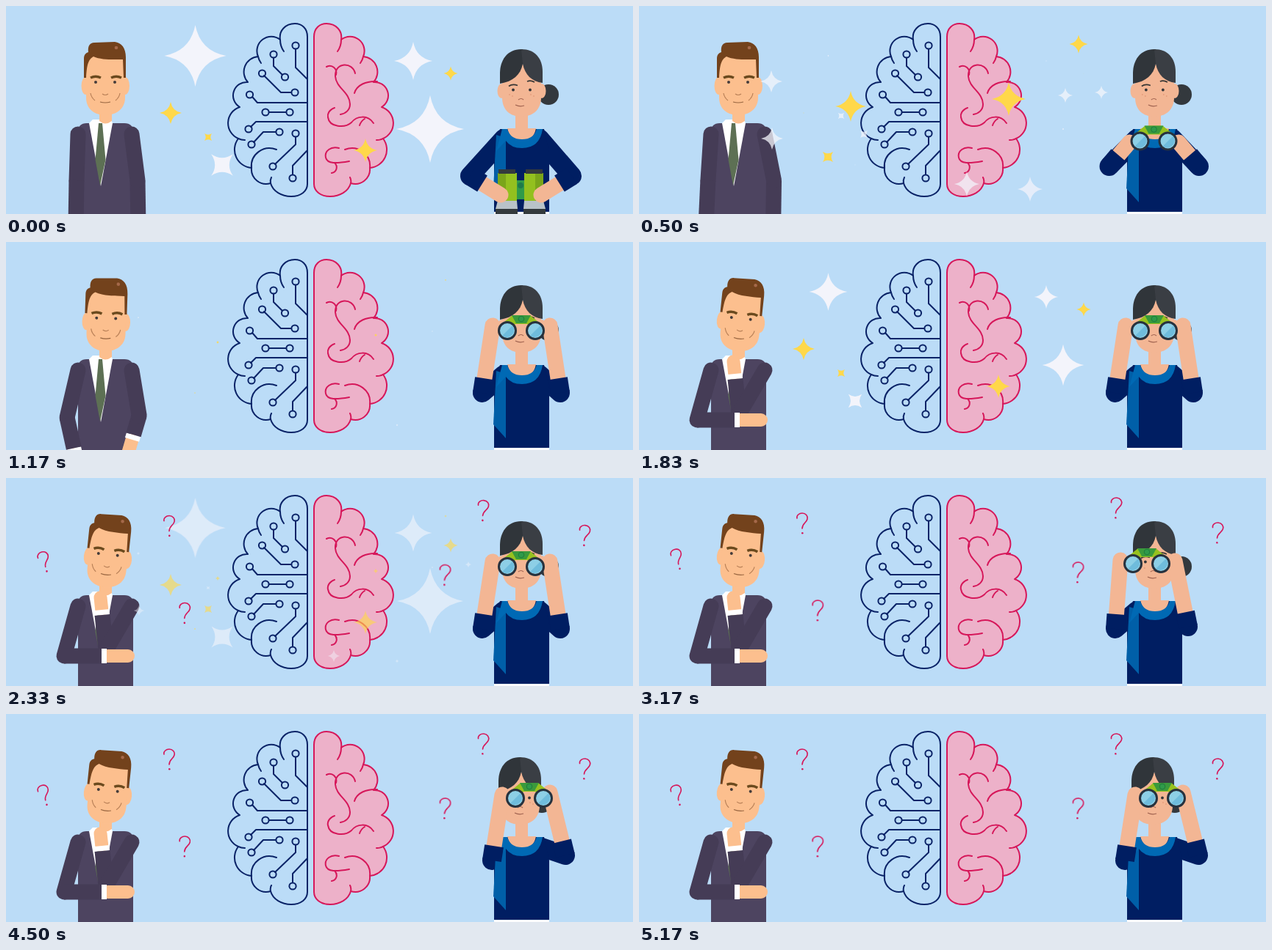
Animation of 853 by 284 pixels, one loop 5.25 s. Source, as an HTML page:

```html
<!DOCTYPE html>
<html lang="en">
<head>
<meta charset="utf-8">
<title>Thinking and looking</title>
<style>
  html, body { margin: 0; width: 100%; height: 100%; overflow: hidden; background: #bbdcf7; }
  svg { display: block; width: 100vw; height: 100vh; }
  .line { fill: none; stroke-width: 2; stroke-linecap: round; stroke-linejoin: round; }
  .navy { stroke: #0a2367; }
  .red { stroke: #d6175a; }
  .limb { fill: none; stroke-linecap: round; }
  .butt { stroke-linecap: butt; }
  .sleeve { stroke: #453c56; stroke-width: 21; }
  .cuff { stroke: #fff; stroke-width: 20; }
  .hand { stroke: #fcbf8e; stroke-width: 18; }
  .forearm { stroke: #f3b694; stroke-width: 21; }
  .top { stroke: #001e62; stroke-width: 26; }
</style>
</head>
<body>
<svg viewBox="0 0 853 284" preserveAspectRatio="none">
  <defs>
    <path id="half" d="M410 42C410 30 402 24 393 24C380 24 371 34 373 46A19.500 19.500 0 0 0 343 69A21 21 0 0 0 329 104A18.300 18.300 0 0 0 318 138A23 23 0 0 0 316 181A25 25 0 0 0 334 221A20 20 0 0 0 360 242C363 253 375 260 388 260C401 260 410 253 410 243Z"/>
    <path id="folds" d="M373 46Q373 55 378 62M343 69Q344 74 347 78M334 221C332 203 350 189 368 196M360 242Q359 238 361 234M316 181Q320 183 325 183"/>
    <path id="star" d="M0-1Q.16-.16 1 0Q.16.16 0 1Q-.16.16-1 0Q-.16-.16 0-1Z"/>
    <g id="ask">
      <path class="line red" style="stroke-width:1.6" d="M-7-7C-8-11-4-14 0-14C5-14 8-10 7-6C6-1 0 0 0 7"/>
      <circle cx=".3" cy="13.3" r="1.3" fill="#d6175a"/>
    </g>
  </defs>

  <rect width="853" height="284" fill="#bbdcf7"/>

  <g class="line navy">
    <use href="#half"/><use href="#folds"/>
    <path d="M394 59V84L410 100M364 71V82L376 94M351 95L374 118H388M335 124L342 132H410M358 145H381M333 165L340 158H410M337 186L350 172H367M394 179V189L366 216M390 230V218L410 197"/>
    <g id="nodes"></g>
  </g>
  <g class="line red">
    <g transform="matrix(-1 0 0 1 829 0)"><use href="#half" fill="#edb1c9"/><use href="#folds"/></g>
    <path d="M436 83C444 79 451 86 449 94M475 92C472 76 447 76 448 96C449 112 468 118 468 134C468 142 462 147 455 148M447 139C439 142 437 148 438 152C440 166 461 167 470 159C477 150 492 148 500 160M488 154Q483 157 481 163M505 103C490 102 477 108 474 119M453 194C442 191 433 198 435 207C437 216 450 215 467 212M443 228C450 227 452 219 447 214"/>
  </g>

  <g id="man">
    <path fill="#4d4460" d="M98 284V172Q98 160 110 160H161Q173 160 173 172V284Z"/>
    <path fill="#fff" d="M113 160L118 155H143L145 160L129 246Z"/>
    <path fill="#5d7054" d="M126 160H131L135.500 210L128 245L121.500 210Z"/>
    <path fill="#fcbf8e" d="M127 138H144V157Q135 164 127 157Z"/>
    <path id="mrHand" class="limb hand"/><path id="mrCuff" class="limb butt cuff"/>
    <path id="mrFore" class="limb butt sleeve"/><path id="mrUp" class="limb sleeve"/>
    <path id="mlUp" class="limb sleeve"/>
    <path id="mlHand" class="limb hand"/><path id="mlCuff" class="limb butt cuff"/>
    <path id="mlFore" class="limb butt sleeve"/>
    <g id="manHead">
      <g fill="#fcbf8e">
        <ellipse cx="108.500" cy="109" rx="6" ry="12"/><ellipse cx="162" cy="109" rx="6" ry="12"/>
        <path d="M109 66H162V125C162 141 149 149 135 149C121 149 109 141 109 125Z"/>
      </g>
      <path fill="#73421c" d="M106 98V72C106 66 109 64 112 63C111 55 114 50 120 50L148 49C157 50 163 57 163 70V98H160L159 73C146 73 130 74 119 69C112 73 110 80 109 98Z"/>
      <circle cx="150" cy="57" r="2.3" fill="#a5694a"/>
      <path d="M115 98Q122 94.500 129 98M143 98Q150 94.500 157 98" fill="none" stroke="#6b4a1e" stroke-width="3.5"/>
      <g fill="#453c3a"><circle cx="122" cy="104" r="2"/><circle cx="148" cy="104" r="2"/></g>
      <g fill="none" stroke="#b98057" stroke-width="1.2">
        <path d="M131 120Q135 123 139 120M115 119Q116 125 121 129M155 119Q154 125 149 129"/>
        <path stroke="#96643f" d="M128 131Q135 133 142 131"/>
      </g>
    </g>
  </g>

  <g id="woman">
    <circle id="bun" cy="121" r="14" fill="#33383d"/>
    <path id="wlUp" class="limb top"/><path id="wrUp" class="limb top"/>
    <path fill="#001e62" d="M672 168H732L739 200V281H664V200Z"/>
    <path fill="#fff" d="M664 281H739V284H664Z"/>
    <path fill="#f3b694" d="M693 138H710V167H721Q718 184 702 184Q686 184 682 167H693Z"/>
    <path fill="#005fa8" d="M667 176L680 180V268L663 249Z"/>
    <path fill="#0069b4" d="M675 168H682Q686 182 702 182Q718 182 722 168H730Q726 194 702 194Q687 194 680 184L667 198Z"/>
    <g id="womanHead">
      <g fill="#f3b694">
        <ellipse cx="674" cy="116" rx="5.500" ry="10"/><ellipse cx="729" cy="116" rx="5.500" ry="10"/>
        <path d="M675 80H728V125C728 142 716 151 701 151C686 151 675 142 675 125Z"/>
      </g>
      <path fill="#30353a" d="M703 59C682 58 672 74 672 92V106C690 103 700 94 703 79Z"/>
      <path fill="#3a3e44" d="M701 59C720 59 730 72 730 90V105C715 103 706 94 703 79Z"/>
      <g id="face">
        <path d="M684 109.500Q689 106 696 108.500M709 103Q714 101 719 104" fill="none" stroke="#363634" stroke-width="1.8"/>
        <g fill="#34363a"><circle cx="690" cy="114.500" r="1.900"/><circle cx="713" cy="114.500" r="1.900"/></g>
        <g fill="#d88668"><circle cx="685" cy="121" r=".7"/><circle cx="689" cy="123" r=".7"/><circle cx="714" cy="121" r=".7"/><circle cx="718" cy="123" r=".7"/></g>
        <path d="M697 128Q701 125 704 128M693 135Q699 138 705 136" fill="none" stroke="#a06350" stroke-width="1.2"/>
      </g>
    </g>
    <g id="lowered">
      <path fill="#2f9a4a" d="M-7-10H7V16H-7Z"/><circle cy="-3" r="4" fill="#1e7a4c"/>
      <path fill="#93c01f" d="M-31-20H-5V18H-31ZM5-20H31V18H5Z"/>
      <path fill="#7aa51a" d="M-31-20H-20V18H-31ZM20-20H31V18H20Z"/>
      <path fill="#343a3d" d="M-30-25H-7V-19H-30ZM7-25H30V-19H7ZM-34 28H-4V36H-34ZM4 28H34V36H4Z"/>
      <path fill="#b9c2c8" d="M-31 18H-5L-4 29H-34ZM5 18H31L34 29H4Z"/>
    </g>
    <path id="wlFore" class="limb forearm"/><path id="wrFore" class="limb forearm"/>
    <path id="wlSleeve" class="limb butt top"/><path id="wrSleeve" class="limb butt top"/>
    <g id="raised">
      <path fill="#97c11f" d="M-28-8L-12-21H12L28-8L15-2L8-9H-8L-15-2Z"/>
      <path fill="#3a9a3c" d="M-13-21H13L7-10H-7Z"/>
      <circle cy="-16" r="3.800" fill="#2f9a4a" stroke="#1e7a3c"/>
      <g fill="#8dcfe6" stroke="#27323e" stroke-width="3"><circle cx="-19" r="11.500"/><circle cx="19" r="11.500"/></g>
      <path fill="#6fbcdc" d="M-12-7A10 10 0 0 1-26 7ZM26-7A10 10 0 0 1 12 7Z"/>
    </g>
  </g>

  <g id="stars"></g>
  <g id="asks"></g>
</svg>
<script>
const LOOP = 5250, FPS = 12, TWINKLE = 2250;
const $ = id => document.getElementById(id);
const clamp = x => Math.min(1, Math.max(0, x));
const ease = (t, from, to) => { const k = clamp((t - from) / (to - from)); return k * k * (3 - 2 * k); };
const mix = (a, b, k) => a.map((v, i) => v + (b[i] - v) * k);
const put = (el, tag, attrs) => {
  const node = document.createElementNS('http://www.w3.org/2000/svg', tag);
  for (const name in attrs) node.setAttribute(name, attrs[name]);
  return el.appendChild(node);
};
const move = (el, value) => el.setAttribute('transform', value);
const segment = (id, a, b) => $(id).setAttribute('d', `M${a}L${b}`);
// Point at distance d past b, on the line from a to b
const past = (a, b, d) => {
  const k = d / Math.hypot(b[0] - a[0], b[1] - a[1]);
  return [b[0] + (b[0] - a[0]) * k, b[1] + (b[1] - a[1]) * k];
};

for (const [cx, cy] of [[394, 54], [364, 66], [379.5, 97], [348.5, 92], [393, 118], [331.5, 121], [353, 145], [386, 145],
  [330, 168], [334, 189], [372, 172], [394, 174], [363, 219], [390, 235]])
  put($('nodes'), 'circle', { cx, cy, r: 4.6 });

// Rise start, rise end, fall start, fall end within one twinkle
const WAVES = {
  a: [-850, -100, 40, 550], b: [-900, -450, 100, 550],
  c: [0, 170, 600, 1000], d: [0, 350, 800, 1250]
};
const WHITE = '#f3f4fb', YELLOW = '#ffd84a', PALE = '#f3f4fbc0';
const stars = [
  [257.5, 68, 42, 'a', WHITE], [577, 168, 46, 'a', WHITE], [554, 75, 26, 'a', WHITE], [294, 217, 21, 'a', WHITE, 45],
  [224, 146, 15, 'b', YELLOW], [275, 179, 7, 'b', YELLOW, 45], [605, 92, 9.5, 'b', YELLOW], [489, 197, 16, 'b', YELLOW],
  [446, 243, 17, 'c', PALE], [181, 181, 15, 'c', PALE], [629, 118, 9, 'c', PALE], [275, 150, 6, 'c', PALE, 45],
  [180, 103, 15, 'd', PALE], [532, 250, 17, 'd', PALE], [580, 122, 10, 'd', PALE], [306, 175, 7, 'd', PALE, 45],
  [288, 137, 21, 'd', YELLOW], [503, 127, 23, 'd', YELLOW], [598, 52, 12.5, 'd', YELLOW], [257, 206, 10, 'd', YELLOW, 45]
].map(([x, y, r, wave, fill, turn = 0]) =>
  ({ x, y, r, turn, wave: WAVES[wave], el: put($('stars'), 'use', { href: '#star', fill }) }));

const asks = [[52, 111, -14], [222, 62, 0], [243, 181, 2], [649, 41, 4], [787, 75, 4], [597, 129, 4]]
  .map(([x, y, turn]) => ({ x, y, turn, el: put($('asks'), 'use', { href: '#ask' }) }));

function drawStars(t) {
  const p = (t + 900) % TWINKLE - 900;
  for (const s of stars) {
    const [a, b, c, d] = s.wave, size = s.r * ease(p, a, b) * (1 - ease(p, c, d));
    move(s.el, `translate(${s.x} ${s.y}) rotate(${s.turn}) scale(${size})`);
  }
  $('stars').setAttribute('opacity', 1 - clamp((t - 2200) / 350));
}

function drawAsks(t) {
  asks.forEach((q, i) => {
    const k = ease(t, 1850 + i * 15, 2250 + i * 15), drop = 4 * (1 - ease(t, 2250, 2650));
    move(q.el, `translate(${q.x} ${q.y + drop}) rotate(${q.turn - 35 * (1 - k)}) scale(${k})`);
    q.el.setAttribute('opacity', k);
  });
}

// Left elbow, left wrist, right elbow, right wrist
const DOWN = [96, 238, 95, 300, 179, 238, 180, 300];
const OUT = [85, 238, 74, 300, 203, 238, 194, 300];
const FOLDED = [79, 243, 130, 243, 136, 235, 131, 187];

function manArm(side, shoulder, elbow, wrist, reach) {
  segment(side + 'Up', shoulder, elbow);
  segment(side + 'Fore', elbow, wrist);
  segment(side + 'Cuff', wrist, past(elbow, wrist, 7));
  segment(side + 'Hand', past(elbow, wrist, 8), past(elbow, wrist, reach));
}

function drawMan(t) {
  const k = ease(t, 850, 1680);
  const p = mix(mix(DOWN, OUT, ease(t, 400, 760)), FOLDED, k);
  manArm('ml', [98, 175], p.slice(0, 2), p.slice(2, 4), 36);
  manArm('mr', [171, 175], p.slice(4, 6), p.slice(6), 24);
  move($('manHead'), `rotate(${6 * k} 133 140)`);
}

// Binocular centre, left elbow, left hand, right elbow, right hand, head x, bun x
const LOW = [700, 248, 631, 232, 673, 258, 770, 232, 728, 258, 0, 738];
const FRONT = [701, 121, 648, 206, 662, 114, 754, 206, 740, 114, 0, 738];
const LEFT = [691, 117, 648, 206, 655, 112, 747, 203, 729, 113, 0, 738];
const RIGHT = [712, 115, 661, 200, 675, 110, 761, 193, 740, 107, -2, 729];

function womanArm(side, shoulder, elbow, hand) {
  const hem = past(hand, elbow, -20);
  segment(side + 'Up', shoulder, elbow);
  segment(side + 'Fore', hem, hand);
  segment(side + 'Sleeve', elbow, hem);
}

function drawWoman(t) {
  let p = mix(LOW, FRONT, ease(t, 0, 1000));
  p = mix(p, LEFT, ease(t, 2420, 3050));
  p = mix(p, RIGHT, ease(t, 3500, 4400));
  const [x, y] = p, up = y < 200;
  womanArm('wl', [677, 181], p.slice(2, 4), p.slice(4, 6));
  womanArm('wr', [726, 181], p.slice(6, 8), p.slice(8, 10));
  $('lowered').style.display = up ? 'none' : '';
  $('raised').style.display = up ? '' : 'none';
  move($(up ? 'raised' : 'lowered'), `translate(${x} ${y})`);
  move($('womanHead'), `translate(${p[10]} 0)`);
  move($('face'), `translate(${up ? (x - 702) * .1 : 0} 0)`);
  $('bun').setAttribute('cx', p[11]);
}

function draw() {
  const now = performance.now() % LOOP;
  const t = Math.floor(now * FPS / 1000 + .05) * 1000 / FPS;
  drawMan(t);
  drawWoman(t);
  drawStars(t);
  drawAsks(t);
  requestAnimationFrame(draw);
}
draw();
</script>
</body>
</html>
```
